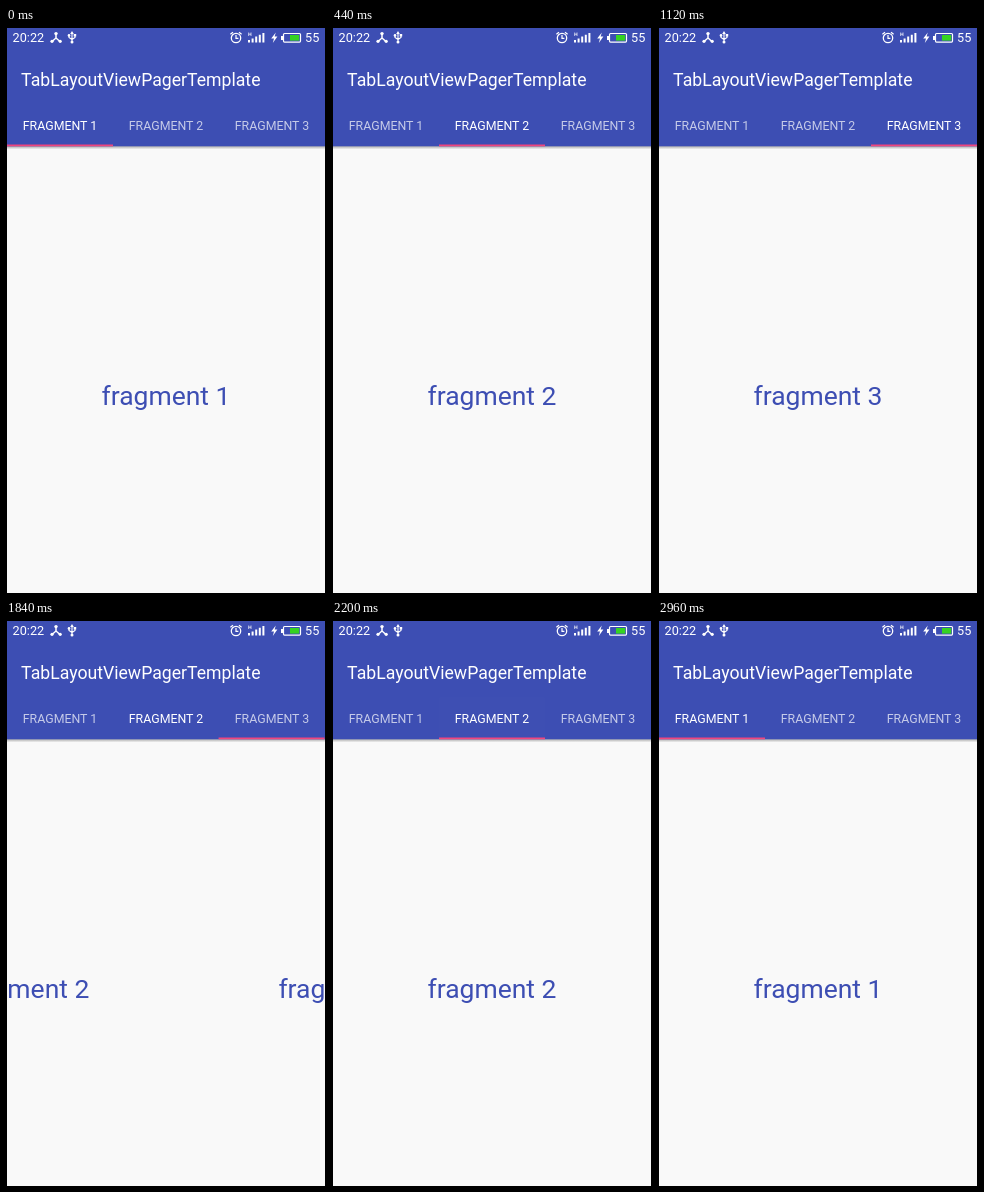
An HTML page that plays this animation: 320 px wide and 565 px high, repeating every 3 s.

```html
<!DOCTYPE html>
<html lang="en">
<head>
<meta charset="utf-8">
<title>Tab layout</title>
<style>
  html, body { margin: 0; width: 100%; height: 100%; overflow: hidden; background: #000; }
  svg { display: block; width: 100vw; height: 100vh; }
  text { font-family: Roboto, "Noto Sans", sans-serif; fill: #fff; }
  .status { font-size: 12.7px; }
  .title { font-size: 17.67px; }
  .tab { font-size: 12.37px; text-anchor: middle; }
  .page { font-size: 26.5px; text-anchor: middle; fill: #3d4eb3; }
  .line { fill: none; stroke: #fff; }
</style>
</head>
<body>
<svg viewBox="0 0 320 565">
  <defs>
    <linearGradient id="shade" x2="0" y2="1">
      <stop stop-color="#000" stop-opacity=".32"/>
      <stop offset="1" stop-color="#000" stop-opacity="0"/>
    </linearGradient>
    <clipPath id="screen"><rect x="1" width="318" height="565"/></clipPath>
    <clipPath id="tabClip"><rect id="tabBox" y="76" width="106" height="42.3"/></clipPath>
  </defs>
  <rect width="320" height="565"/>
  <g clip-path="url(#screen)">
    <rect y="118" width="320" height="447" fill="#f9f9f9"/>
    <g id="pages"></g>
    <rect y="118" width="320" height="3.5" fill="url(#shade)"/>
    <rect width="320" height="118.3" fill="#3d4eb3"/>
    <g clip-path="url(#tabClip)"><circle id="ripple" fill="#fff"/></g>
    <rect id="indicator" y="116.5" width="106" height="1.8" fill="#f0467f"/>
    <g id="tabs"></g>
  </g>

  <text class="title" x="15.1" y="58">TabLayoutViewPagerTemplate</text>
  <text class="status" x="6.6" y="14.2">20:22</text>
  <text class="status" x="299" y="14.2">55</text>

  <g fill="#fff">
    <path class="line" d="M50 5V10L46 13.5M50 10L54 13.5" stroke-width="1.5"/>
    <circle cx="50" cy="5.6" r="1.7"/>
    <circle cx="46" cy="13.3" r="1.6"/>
    <circle cx="54.2" cy="13.3" r="1.6"/>

    <path class="line" d="M66 5V14M63 7.5V9.5L66 11.5L69 9.5V7.5" stroke-width="1.1"/>
    <path d="M66 3L67.8 6H64.2ZM67.7 6H70.2V8.4H67.7Z"/>
    <circle cx="63" cy="7.4" r="1.3"/>
    <circle cx="66" cy="14" r="1.5"/>

    <circle class="line" cx="230" cy="10" r="4.7" stroke-width="1.3"/>
    <path class="line" d="M230 7V10.4H232.4M224.4 6.3L227 4.2M235.6 6.3L233 4.2" stroke-width="1.2"/>

    <path class="line" d="M242.7 4.5V8M245 4.5V8M242.7 6.2H245" stroke-width=".7"/>
    <path d="M242 12h2v2.4h-2ZM245.6 10.4h2v4h-2ZM249.2 8.6h2v5.8h-2ZM252.8 6.8h2v7.6h-2ZM256.4 5h2v9.4h-2Z"/>

    <path d="M269.8 4.5L265.2 10.6H268L266.8 15L271.4 8.6H268.6Z"/>

    <rect x="275" y="8" width="2" height="4"/>
    <rect class="line" x="277.5" y="5.5" width="17" height="8.6" rx="1" stroke-width="1.2"/>
    <rect x="284" y="7" width="9.2" height="5.6" fill="#35d321"/>
  </g>
</svg>
<script>
const LOOP = 3000, STEP = 40, PAGE = 318, TAB = 106;
const TAPS = [
  { at: 33, from: 0, to: 1 },
  { at: 713, from: 1, to: 2 },
  { at: 1810, from: 2, to: 1 },
  { at: 2553, from: 1, to: 0 }
];
const REST = { at: -1000, from: 0, to: 0 };

const el = id => document.getElementById(id);
const clamp = v => Math.min(1, Math.max(0, v));
const mix = (a, b, k) => a + (b - a) * k;
const tabLeft = i => 1 + TAB * i;

function set(node, attrs) {
  for (const name in attrs) node.setAttribute(name, attrs[name]);
}

function addText(parent, className, y, content) {
  const node = document.createElementNS("http://www.w3.org/2000/svg", "text");
  set(node, { class: className, y });
  node.textContent = content;
  return el(parent).appendChild(node);
}

const tabs = [0, 1, 2].map(i => addText("tabs", "tab", 102, `FRAGMENT ${i + 1}`));
const pages = [0, 1, 2].map(i => addText("pages", "page", 376.5, `fragment ${i + 1}`));
tabs.forEach((tab, i) => set(tab, { x: tabLeft(i) + TAB / 2 }));

const quinticOut = u => 1 - (1 - u) ** 5;
const logOut = u => u >= 1 ? 1 : 1 - 400 ** (-1.4 * u);

// cubic-bezier(.4, 0, .2, 1)
function fastOutSlowIn(u) {
  let low = 0, high = 1;
  for (let i = 0; i < 24; i++) {
    const s = (low + high) / 2, r = 1 - s;
    if (1.2 * r * r * s + 0.6 * r * s * s + s ** 3 < u) low = s;
    else high = s;
  }
  return low * low * (3 - 2 * low);
}

function drawRipple(tap, age) {
  const grow = logOut(clamp((age - 75) / 250));
  const left = tabLeft(tap.to), center = left + TAB / 2;
  set(el("tabBox"), { x: left });
  set(el("ripple"), {
    cx: mix(center + 10, center, grow),
    cy: mix(95.3, 97.2, grow),
    r: 57 * grow,
    opacity: 0.13 * (1 - clamp((age - 64) / 333))
  });
}

function draw(time) {
  const tap = TAPS.filter(t => t.at <= time).pop() || REST;
  const age = time - tap.at;
  const scroll = mix(tap.from, tap.to, quinticOut(clamp(age / 200)));
  const marker = mix(tap.from, tap.to, fastOutSlowIn(clamp((age - 17) / 300)));

  pages.forEach((page, i) => set(page, { x: 160 + (i - scroll) * PAGE }));
  tabs.forEach((tab, i) => set(tab, { "fill-opacity": i === tap.to ? 1 : 0.7 }));
  set(el("indicator"), { x: tabLeft(marker) });
  drawRipple(tap, age);
}

const start = performance.now();
function tick() {
  const time = (performance.now() - start) % LOOP;
  draw(Math.floor(time / STEP) * STEP);
  requestAnimationFrame(tick);
}
tick();
</script>
</body>
</html>
```
